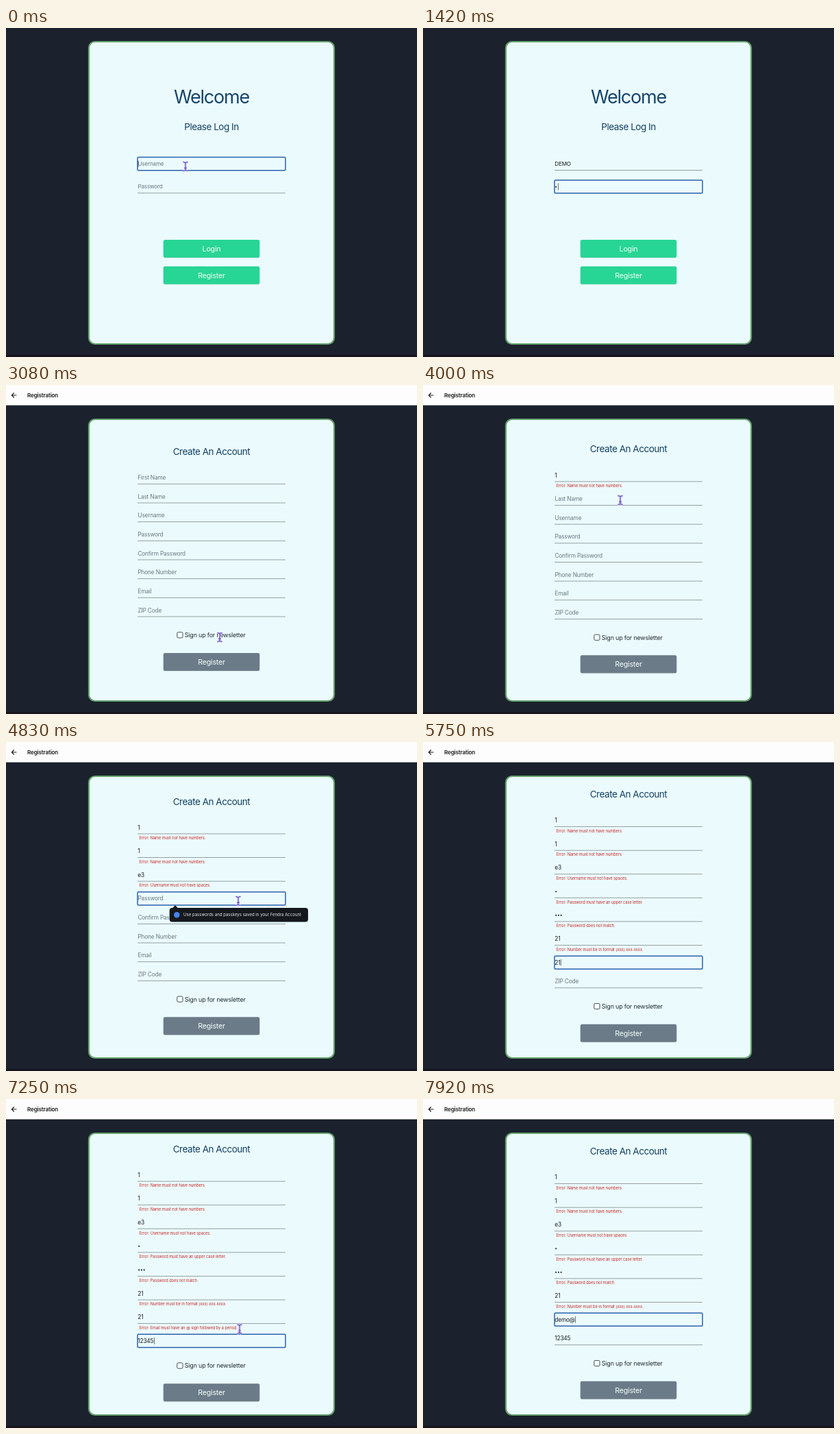
Write an HTML page that moves like this. It is 600 by 480 pixels and loops after 8000 ms.

```html
<!DOCTYPE html>
<html lang="en">
<head>
<meta charset="utf-8">
<title>Login and registration form</title>
<style>
  html, body { margin: 0; width: 100%; height: 100%; overflow: hidden; background: #1b222d; }
  svg { display: block; width: 600px; height: 480px; font-family: Inter, "Open Sans", sans-serif; }
</style>
</head>
<body>
<svg id="stage" viewBox="0 0 600 480"></svg>
<script>
const LOOP = 8000, REGISTER_AT = 3080;
const LEFT = 192, RIGHT = 408, ERROR_SPACE = 6.93;
const GREEN = '#27d594', GREY = '#6c7b88', NAVY = '#123f61';
const stage = document.getElementById('stage');
const pen = document.createElement('canvas').getContext('2d');

const between = (t, [from, to]) => t >= from && t < to;
const typed = (word, keys, t) => word.slice(0, keys.filter(k => t >= k).length);

// focus and error are time spans; each entry is a word with its keystroke times
const loginFields = [
  { label: 'Username', focus: [[0, 1050]], entries: [['DEMO', [350, 470, 590, 710]]],
    error: 'Username not found.', shown: [2250, LOOP] },
  { label: 'Password', focus: [[1050, 2200]], entries: [['•••', [1300, 1430, 1560]]],
    error: 'Password incorrect.', shown: [2250, LOOP] }
];
const registerFields = [
  { label: 'First Name', focus: [[3480, 3900]], entries: [['1', [3650]]],
    error: 'Name must not have numbers.', shown: [3800, LOOP] },
  { label: 'Last Name', focus: [[4080, 4330]], entries: [['1', [4200]]],
    error: 'Name must not have numbers.', shown: [4300, LOOP] },
  { label: 'Username', focus: [[4330, 4750]], entries: [['e3', [4420, 4530]]],
    error: 'Username must not have spaces.', shown: [4600, LOOP] },
  { label: 'Password', focus: [[4750, 5100]], entries: [['•', [5000]]],
    error: 'Password must have an upper case letter.', shown: [5080, LOOP] },
  { label: 'Confirm Password', focus: [[5100, 5350]], entries: [['•••', [5170, 5220, 5270]]],
    error: 'Password does not match.', shown: [5330, LOOP] },
  { label: 'Phone Number', focus: [[5350, 5560]], entries: [['21', [5400, 5470]]],
    error: 'Number must be in format (xxx) xxx-xxxx.', shown: [5540, LOOP] },
  { label: 'Email', focus: [[5560, 6000], [7350, LOOP]],
    entries: [['21', [5620, 5690]], ['demo@', [7550, 7620, 7690, 7760, 7830]]],
    error: 'Email must have an @ sign followed by a period.', shown: [6000, 7350] },
  { label: 'ZIP Code', focus: [[6000, 7350]], entries: [['12345', [6150, 6250, 6800, 6950, 7100]]],
    error: 'ZIP Code must have 5 digits.', shown: [6400, 7100] }
];

// pointer waypoints: time, x, y
const pointerPath = [
  [0, 262, 202], [850, 262, 202], [1080, 268, 233], [1650, 268, 233], [2150, 318, 322],
  [2560, 318, 322], [2880, 312, 368], [3120, 312, 368], [3440, 285, 136], [3850, 285, 136],
  [4000, 288, 168], [4150, 290, 168], [4380, 300, 197], [4720, 339, 232], [6350, 339, 232],
  [6560, 370, 361], [7120, 370, 361], [7320, 330, 326], [LOOP, 330, 326]
];
const pointerHidden = [[350, 850], [1250, 1650], [3640, 3800], [4960, 6350], [6760, 7120], [7500, LOOP]];

// y is the middle of the capitals
function text(str, x, y, size, fill, { anchor = 'start', tight = -.02, weight = 400 } = {}) {
  return `<text x="${x}" y="${y + size * .364}" font-size="${size}" fill="${fill}" font-weight="${weight}"
    text-anchor="${anchor}" letter-spacing="${tight * size}">${str}</text>`;
}
const centred = (str, y, size, fill, tight) => text(str, 300, y, size, fill, { anchor: 'middle', tight });

function rect(x, y, w, h, fill, rx = 0, extra = '') {
  return `<rect x="${x}" y="${y}" width="${w}" height="${h}" rx="${rx}" fill="${fill}" ${extra}/>`;
}

const card = top => rect(121, top + 1, 358, 460 - top, '#ebfbfd', 9, 'stroke="#68a36e" stroke-width="2.2"');

function button(label, y, fill) {
  return rect(230, y - 12.2, 140, 26, '#000', 2.5, 'opacity=".13"') +
    rect(229.7, y - 13, 140.6, 26, fill, 2.5) + centred(label, y, 10.7, '#f5fffc');
}

function field(f, y, size, t) {
  const [word, keys] = f.entries.filter((e, i) => !i || t >= e[1][0] - 70).pop();
  const value = typed(word, keys, t);
  const focused = f.focus.some(span => between(t, span));
  let out = focused
    ? rect(LEFT, y - 9.6, RIGHT - LEFT, 19.2, 'none', 1.5, 'stroke="#2a62ad" stroke-width="1.5"')
    : rect(LEFT, y + 8.9, RIGHT - LEFT, .9, '#8c979a');

  if (!value) out += text(f.label, LEFT + .4, y, size, '#68777d');
  else if (value[0] === '•')
    out += [...value].map((_, i) => `<circle cx="${194.2 + i * 3.7}" cy="${y + .3}" r="1.05" fill="#17191c"/>`).join('');
  else out += text(value, LEFT + .3, y, size, '#17191c');

  const lastKey = keys.filter(k => t >= k).pop();
  if (focused && (t < 350 || t - lastKey < 300)) {
    pen.font = `${size}px Inter, sans-serif`;
    const width = value[0] === '•' ? value.length * 3.7 + 1 : pen.measureText(value).width * .98;
    out += rect(LEFT + .6 + width, y - 4.8, .7, 9.6, '#333');
  }
  if (between(t, f.shown)) out += text('Error: ' + f.error, 194.5, y + 15.6, 5.6, '#c8201f', { tight: 0 });
  return out;
}

// Stacks the fields; returns the drawing and the middle of the row after the last one
function stack(fields, y, pitch, size, t) {
  let out = '';
  for (const f of fields) {
    out += field(f, y, size, t);
    y += pitch + (between(t, f.shown) ? ERROR_SPACE : 0);
  }
  return [out, y];
}

const lift = (fields, t) => fields.filter(f => between(t, f.shown)).length * ERROR_SPACE / 2;

function loginPage(t) {
  const up = lift(loginFields, t);
  const [fields, end] = stack(loginFields, 198.2 - up, 33.3, 8.1, t);
  const shade = span => between(t, span) ? '#48dca4' : GREEN;
  return card(19) +
    centred('Welcome', 100.5 - up, 27, '#17456b', -.045) +
    centred('Please Log In', 143.8 - up, 13.5, NAVY, -.035) + fields +
    button('Login', end + 57.2, shade([2150, 2600])) +
    button('Register', end + 96, shade([2860, REGISTER_AT]));
}

function tooltip(y) {
  return `<path d="M243 ${y - 10}l4-4 4 4z" fill="#15191d"/>` +
    rect(238.7, y - 10.3, 202.3, 20.6, '#15191d', 4) +
    `<circle cx="249.3" cy="${y}" r="4.2" fill="#4285f4"/>` +
    text('Use passwords and passkeys saved in your Fendra Account', 259, y, 6, '#e4e7e9', { tight: .005 });
}

function registerPage(t) {
  const up = lift(registerFields, t), title = 97 - up;
  const [fields, end] = stack(registerFields, title + 38, 27.66, 8.3, t);
  const check = end + 8.6;
  return rect(0, 0, 600, 29.6, '#fdfdfd') +
    '<path d="M15.5 15H8.5M11.8 11.5L8.3 15l3.5 3.5" fill="none" stroke="#1c1c1e" stroke-width="1.1"/>' +
    text('Registration', 31, 15.2, 8.1, '#1c1c1e', { weight: 600 }) +
    card(49) + centred('Create An Account', title, 13.5, NAVY, -.035) + fields +
    rect(249.8, check - 4.2, 8.2, 8.2, '#f6feff', 1.6, 'stroke="#454c52" stroke-width="1"') +
    text('Sign up for newsletter', 260.8, check, 8.95, '#22292e') +
    button('Register', check + 39, GREY) +
    (between(t, [4780, 5000]) ? tooltip(title + 165.7) : '');
}

function pointer(t) {
  if (pointerHidden.some(span => between(t, span))) return '';
  const i = pointerPath.findIndex(p => p[0] > t);
  const [t0, x0, y0] = pointerPath[i - 1], [t1, x1, y1] = pointerPath[i];
  const p = (t - t0) / (t1 - t0), ease = p * p * (3 - 2 * p);
  const x = x0 + (x1 - x0) * ease, y = y0 + (y1 - y0) * ease;
  const onButton = t < REGISTER_AT && y > 305;
  const beam = 'M-3.6-6.4Q-.6-6.4 0-4.6Q.6-6.4 3.6-6.4M0-4.6V4.6M-3.6 6.4Q-.6 6.4 0 4.6Q.6 6.4 3.6 6.4M-2 2.4H2';
  const hand = 'M-3.8-6.2Q-2.6-7.2-1.7-5.6L-.2-1.8Q1-3 2-1.6Q3.2-2.6 4-1.1Q5.4-1.6 5.7 0L6 3.2Q6 5 4.8 7L-.6 7.2Q-2.6 5-5.6 2.6Q-6-.2-2.6 1.4L-4.4-4.2Q-4.6-5.6-3.8-6.2Z';
  const shape = onButton
    ? `<path d="${hand}" fill="#7444d4" stroke="#efe6ff" stroke-width="1"/>
       <path d="M1 2.4V5M3 2.2V5" stroke="#cdb6f7" stroke-width=".7"/>`
    : `<path d="${beam}" fill="none" stroke="#d9d2f8" stroke-width="3.2"/>
       <path d="${beam}" fill="none" stroke="#6a4fc4" stroke-width="1.2"/>`;
  return `<g transform="translate(${x} ${y})">${shape}</g>`;
}

let shownMarkup = '';
function render(now) {
  const t = now % LOOP;
  const markup = rect(0, 0, 600, 480, '#1b222d') + rect(0, 477, 600, 3, '#19151f') +
    (t < REGISTER_AT ? loginPage(t) : registerPage(t)) + pointer(t);
  if (markup !== shownMarkup) stage.innerHTML = shownMarkup = markup;
}

const start = performance.now();
function tick() {
  render(performance.now() - start);
  requestAnimationFrame(tick);
}
tick();
</script>
</body>
</html>
```
